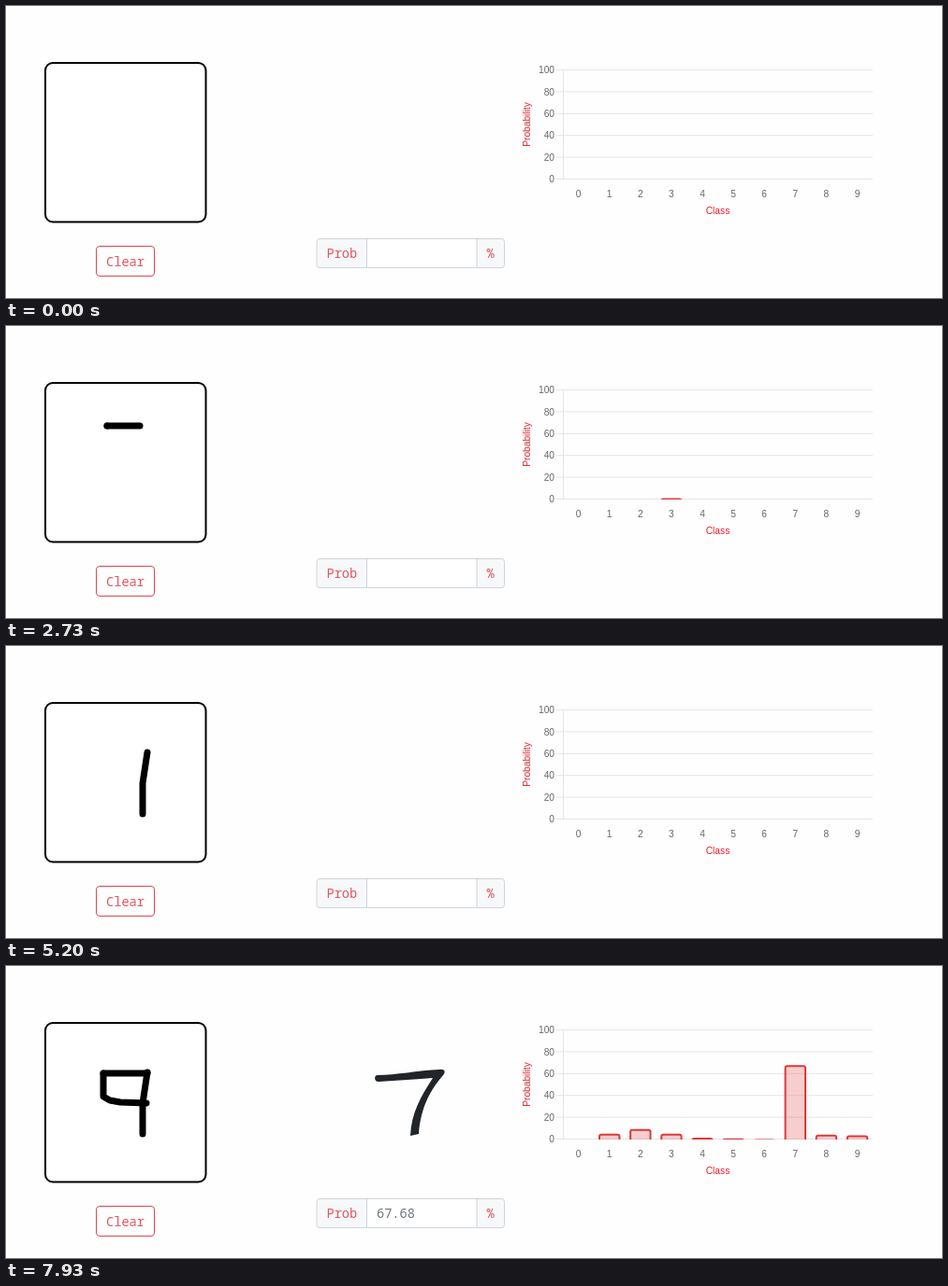
Write an HTML page that moves like this. It is 1000 by 313 pixels and loops after 8000 ms.

```html
<!DOCTYPE html>
<html lang="en">
<head>
<meta charset="utf-8">
<title>Digit classifier</title>
<style>
  html, body { margin: 0; width: 100%; height: 100%; overflow: hidden; background: #fefefe; }
  svg { display: block; width: 100vw; height: 100vh; }
  .axis { font: 10.2px "Liberation Sans", Arial, sans-serif; fill: #666; }
  .title { fill: #e0232b; text-anchor: middle; }
  .mono { font: 300 13.65px "Noto Sans Mono", "DejaVu Sans Mono", monospace; fill: #e25563; }
  .ink { fill: none; stroke: #000; stroke-width: 7; stroke-linecap: round; stroke-linejoin: round; }
  .grid { stroke: #e5e5e5; }
  .bar { fill: rgba(225, 50, 50, .24); stroke: #dc3a38; stroke-width: 2; }
</style>
</head>
<body>
<svg id="stage" viewBox="0 0 1000 313">
  <clipPath id="plot"><rect x="590" y="60" width="340" height="126"/></clipPath>
  <rect x="42" y="61" width="171.5" height="170.5" rx="8" fill="#fff" stroke="#000" stroke-width="2"/>
  <g id="inks"></g>

  <rect id="ring" x="94" y="255" width="67.5" height="37" rx="5.5" fill="#f1a9b0"/>
  <rect id="button" x="96.5" y="257.5" width="62" height="32" rx="3.5" stroke="#dc4552"/>
  <text id="label" class="mono" x="127.5" y="278.5" text-anchor="middle">Clear</text>

  <path id="digit" fill="#212529"/>

  <rect x="332" y="249.5" width="200.5" height="31" rx="3" fill="#f6f8f9" stroke="#ced4d8"/>
  <rect x="385.5" y="249.5" width="117.5" height="31" fill="#fff" stroke="#ced4d8"/>
  <text class="mono" x="342.5" y="270">Prob</text>
  <text class="mono" x="513.5" y="270">%</text>
  <text id="prob" class="mono" x="396" y="270" style="fill:#6c757d"></text>

  <g id="axes"></g>
  <text class="axis title" x="760.5" y="223">Class</text>
  <text class="axis title" transform="translate(560 127) rotate(-90)">Probability</text>
  <g id="bars" clip-path="url(#plot)"></g>
</svg>
<script>
const LOOP = 8000, STEP = 130, FIRST_STEP = 910, GROW = 1000;
const CLASSES = [...Array(10).keys()];
const byId = id => document.getElementById(id);

function add(parent, tag, attrs, text = "") {
  const el = document.createElementNS("http://www.w3.org/2000/svg", tag);
  for (const key in attrs) el.setAttribute(key, attrs[key]);
  el.textContent = text;
  return byId(parent).appendChild(el);
}

// Pen strokes: drawn from start to end, wiped at until
const strokes = [
  { start: 850, end: 1440, until: 2045,
    d: "M111 104H130L146 112 150 118 149 126 141 134 126 139 136 137 144 138 154 145 159 157V177L147 193 131 199 110 200 100 193" },
  { start: 2520, end: 2715, until: 4075, d: "M143 107H108" },
  { start: 2730, end: 3300, until: 4075,
    d: "M108 107L106 138 124 134 142 138 152 149 154 166 147 183 131 194 110 195" },
  { start: 4810, end: 5150, until: LOOP, d: "M151 114L146 147V180" },
  { start: 6110, end: 6365, until: LOOP, d: "M151 115H104" },
  { start: 6890, end: 7750, until: LOOP, d: "M104 115V140L111 144 122 146 150 147" },
];
for (const s of strokes)
  s.el = add("inks", "path", { class: "ink", d: s.d, pathLength: 1 });

const digits = {
  1: "M431 112Q434 110 437 111Q438 112 438 116L436 177Q435 181 429 181Q427 180 428 176L430 115Z",
  3: "M402 127C400 121 403 120 408 119C425 113 440 111 451 111C461 112 463 118 457 125C450 133 440 137 432 141C446 138 462 141 462 151C462 167 440 181 424 181C418 181 417 177 420 176C437 174 452 164 452 154C452 146 437 146 414 154L411 151C420 143 440 135 448 125C452 119 447 118 440 118C428 119 415 124 402 127Z",
  5: "M415 113C432 113 447 111 459 111C464 112 463 117 458 118L423 121 418 138C438 134 458 139 457 153C456 170 432 181 413 182C408 181 408 176 413 175C430 173 448 164 448 154C448 143 428 143 411 148L408 145 414 115Z",
  7: "M397 117C416 117 440 112 463 111C469 110 470 114 467 117C455 131 443 150 441 180L432 182C433 158 443 140 456 120C440 121 418 123 398 124C393 124 393 117 397 117Z",
};

const onlyClass = (digit, value, rest) => CLASSES.map(c => c === digit ? value : rest);
const nothing = { values: onlyClass(-1, 0, 0) };
const results = [
  { at: 0, ...nothing },
  { at: 1475, digit: 3, values: onlyClass(3, 99.99, 0) },
  { at: 2045, ...nothing },
  { at: 3420, digit: 5, values: onlyClass(5, 99.84, 0) },
  { at: 4075, ...nothing },
  { at: 5300, digit: 1, values: onlyClass(1, 99.97, .003) },
  { at: 6500, digit: 7, values: [0, 4.9, 9.2, 4.9, 1.2, .7, .05, 67.68, 4, 3.5] },
];

const presses = [
  { over: 1940, click: 2045, out: 2330, blur: 2520 },
  { over: 4020, click: 4075, out: 4400, blur: 4800 },
];

const yOf = value => 185.5 - value * 1.17;
const xOf = c => 611.6 + c * 33.1;

for (let v = 0; v <= 100; v += 20) {
  add("axes", "path", { class: "grid", d: `M588 ${yOf(v)}H926` });
  add("axes", "text", { class: "axis", x: 586, y: yOf(v) + 3.6, "text-anchor": "end" }, v);
}
add("axes", "path", { class: "grid", d: "M595.5 68V186" });
for (const c of CLASSES)
  add("axes", "text", { class: "axis", x: xOf(c), y: 204.5, "text-anchor": "middle" }, c);
const bars = CLASSES.map(() => add("bars", "path", { class: "bar" }));

// Each result eases out from wherever the previous one had got to
function valueAt(i, c, t) {
  if (i === 0) return 0;
  const { at, values } = results[i];
  const left = (1 - Math.min((t - at) / GROW, 1)) ** 4;
  return values[c] + (valueAt(i - 1, c, at) - values[c]) * left;
}

function draw(t) {
  for (const s of strokes) {
    const p = Math.min((t - s.start) / (s.end - s.start), 1);
    s.el.style.display = t >= s.start && t < s.until ? "" : "none";
    s.el.setAttribute("stroke-dasharray", `${Math.max(p, 0)} 2`);
  }

  const current = results.findLastIndex(r => t >= r.at);
  const { digit, values } = results[current];
  byId("digit").setAttribute("d", digits[digit] || "");
  byId("prob").textContent = digit ? values[digit].toFixed(2) : "";

  bars.forEach((bar, c) => {
    const v = valueAt(current, c, t), x = xOf(c) - 10.7, y = yOf(v) + 1;
    bar.style.display = v > .001 ? "" : "none";
    bar.setAttribute("d", `M${x} 190V${y + 2}q0-2 2-2h17.4q2 0 2 2V190`);
  });

  const hover = presses.some(p => t >= p.over && t < p.out);
  const focus = presses.some(p => t >= p.click && t < p.blur);
  byId("ring").style.display = focus ? "" : "none";
  byId("button").setAttribute("fill", hover ? "#dc4552" : "#fff");
  byId("label").style.fill = hover ? "#fff" : "";
}

function tick(now) {
  const t = now % LOOP;
  draw(t < FIRST_STEP ? 0 : Math.floor(t / STEP) * STEP);
  requestAnimationFrame(tick);
}
draw(0);
requestAnimationFrame(tick);
</script>
</body>
</html>
```
